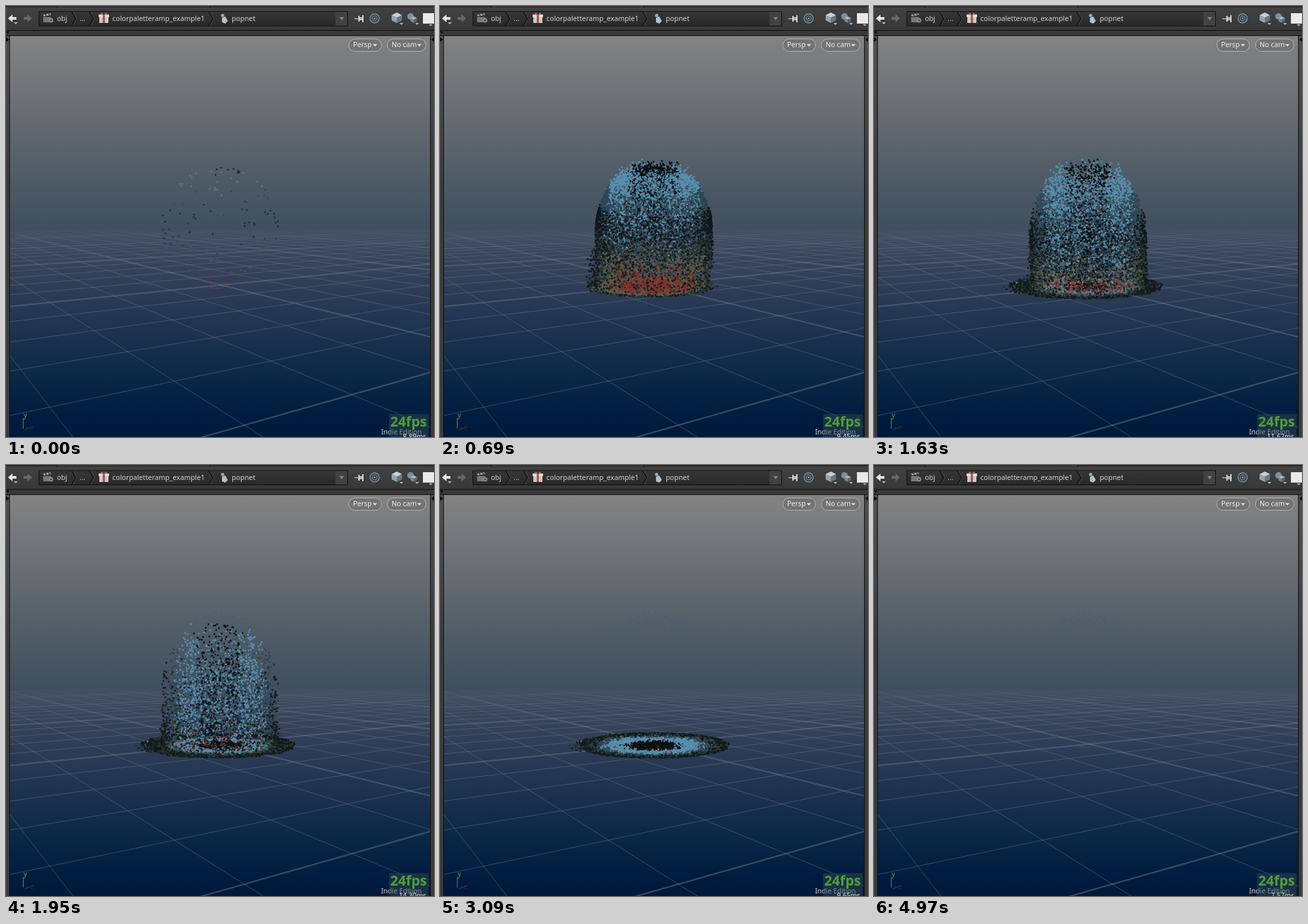
An HTML page with a canvas for the animation above (5040 ms loop, 656x661 px).

```html
<!DOCTYPE html>
<html lang="en">
<head>
<meta charset="utf-8">
<title>Particle viewport</title>
<style>
  html, body { margin: 0; width: 100%; height: 100%; overflow: hidden; background: #333; }
  canvas { display: block; }
</style>
</head>
<body>
<canvas id="stage" width="656" height="661"></canvas>
<script>
const W = 656, H = 661, LOOP = 5040, FRAMES = 65;
const FONT = '"Noto Sans", "Open Sans", sans-serif';
const stage = document.getElementById('stage').getContext('2d');
const backdrop = document.createElement('canvas');
backdrop.width = W;
backdrop.height = H;
const g = backdrop.getContext('2d');

let seed = 20177;
function rand() {
  seed = (seed + 0x6D2B79F5) | 0;
  let r = Math.imul(seed ^ (seed >>> 15), 1 | seed);
  r = (r + Math.imul(r ^ (r >>> 7), 61 | r)) ^ r;
  return ((r ^ (r >>> 14)) >>> 0) / 4294967296;
}

// ---------- drawing helpers ----------
function rect(x, y, w, h, fill) {
  g.fillStyle = fill;
  g.fillRect(x, y, w, h);
}
function vertical(y0, y1, stops) {
  const grad = g.createLinearGradient(0, y0, 0, y1);
  for (const [y, color] of stops) grad.addColorStop((y - y0) / (y1 - y0), color);
  return grad;
}
function poly(points, fill) {
  g.beginPath();
  points.forEach(([x, y]) => g.lineTo(x, y));
  g.closePath();
  g.fillStyle = fill;
  g.fill();
}
function line(points, color, width = 1) {
  g.beginPath();
  points.forEach(([x, y]) => g.lineTo(x, y));
  g.strokeStyle = color;
  g.lineWidth = width;
  g.stroke();
}
function disc(x, y, r, fill) {
  g.beginPath();
  g.arc(x, y, r, 0, 7);
  g.fillStyle = fill;
  g.fill();
}
function ring(x, y, r, color, width = 1) {
  g.beginPath();
  g.arc(x, y, r, 0, 7);
  g.strokeStyle = color;
  g.lineWidth = width;
  g.stroke();
}
function label(text, x, y, color = '#d2d2d2', size = 10.75, weight = 400) {
  g.font = `${weight} ${size}px ${FONT}`;
  g.fillStyle = color;
  g.fillText(text, x, y);
}

// ---------- viewport ----------
const HORIZON = 303;

// Lines share a vanishing point; the inverse slope changes evenly from line to line.
function gridFamily(vx, side, inverse, step, first, last) {
  const stroke = vertical(341, H, [[341, 'rgba(120,132,142,0)'], [356, 'rgba(120,132,142,.17)'],
    [395, 'rgba(120,132,142,.36)'], [H, 'rgba(120,132,142,.46)']]);
  for (let n = first; n <= last; n++) {
    const run = inverse - step * n, drop = 700;
    line([[vx, HORIZON], [vx + side * run * drop, HORIZON + drop]], stroke, n % 5 ? 1 : 2.2);
  }
}

function drawViewport() {
  rect(6, 46, 644, 615, vertical(46, H, [[46, '#838383'], [120, '#737578'], [200, '#5f666d'],
    [270, '#4e5a65'], [325, '#435261'], [375, '#3a475c'], [430, '#2f3d57'], [500, '#1d3350'],
    [570, '#0b2746'], [630, '#001c3f'], [H, '#00193b']]));
  g.save();
  g.beginPath();
  g.rect(6, 46, 644, 615);
  g.clip();
  gridFamily(-174, 1, 4.032, 0.815, -30, 4);
  gridFamily(1562, -1, 9.856, 1.267, -20, 6);
  g.restore();

  // origin marker
  line([[312, 432], [328, 433], [340, 428]], 'rgba(105,85,80,.6)');
  line([[322, 428], [332, 425], [346, 424]], 'rgba(75,85,85,.6)');

  // corner axes
  line([[26.5, 632], [26.5, 648]], '#3c8f36', 1.2);
  line([[29, 650], [36, 647], [42, 645]], '#56362c', 1.2);
  line([[31, 646], [41, 650]], '#3a2c2c');
  label('y', 27, 631, '#58b04a', 10);

  for (const [x, w, text] of [[525, 51, 'Persp'], [584, 60, 'No cam']]) {
    g.beginPath();
    g.roundRect(x + .5, 50.5, w - 1, 19, 9.5);
    g.fillStyle = 'rgba(105,105,105,.55)';
    g.fill();
    g.strokeStyle = '#b4b4b4';
    g.lineWidth = 1;
    g.stroke();
    label(text, x + 7, 63, '#ececec', 10.67);
    const a = x + w - 14;
    poly([[a, 58.5], [a + 7, 58.5], [a + 3.5, 62]], '#e0e0e0');
  }

  label('Indie Edition', 575, 657, '#d5d8d0', 10.5);
  rect(587, 626, 61, 35, 'rgba(48,72,84,.5)');
  g.lineJoin = 'round';
  g.font = `700 21px ${FONT}`;
  g.strokeStyle = '#1e3a2c';
  g.lineWidth = 1.5;
  g.strokeText('24fps', 589, 645);
  label('24fps', 589, 645, '#4d9c46', 21, 700);
}

// ---------- toolbar ----------
function arrow(x, dir, color) {
  const tip = x - dir * 7;
  poly([[tip, 19], [x, 13], [x, 17], [x + dir * 6, 17], [x + dir * 6, 21], [x, 21], [x, 25]], color);
}
function cube(x, y, s, top, left, right) {
  const h = s / 2;
  poly([[x, y - s], [x + s, y - h], [x, y], [x - s, y - h]], top);
  poly([[x - s, y - h], [x, y], [x, y + s], [x - s, y + h]], left);
  poly([[x + s, y - h], [x, y], [x, y + s], [x + s, y + h]], right);
}
function chevron(x) {
  line([[x, 9], [x + 6, 19.5], [x, 30]], '#141414', 1.6);
  line([[x + 1.5, 9], [x + 7.5, 19.5], [x + 1.5, 30]], '#4b4b4b');
}

function drawToolbar() {
  rect(0, 0, W, 46, vertical(0, 46, [[0, '#424242'], [36, '#383838'], [46, '#343434']]));
  rect(0, 0, W, 2, '#272727');
  rect(78, 0, 235, 1, '#3b3b3b');
  for (const x of [78, 312]) rect(x, 0, 1, 3, '#111');
  rect(0, 37, W, 1, '#0e0e0e');
  rect(0, 38, W, 7, '#393939');
  rect(0, 45, W, 1, '#0e0e0e');
  const side = vertical(46, 270, [[46, '#505050'], [270, '#3b3b3b']]);
  rect(0, 46, 6, 615, side);
  rect(650, 46, 6, 615, side);
  for (const x of [5, 650]) rect(x, 46, 1, 615, '#0e0e0e');
  poly([[0, 39], [5, 39], [2.5, 43]], '#050505');
  poly([[0, 48], [5, 51.5], [0, 55]], '#050505');
  poly([[656, 48], [652, 51.5], [656, 55]], '#050505');

  arrow(10, 1, '#e2e2e2');
  poly([[12, 25], [18, 25], [15, 28]], '#bbb');
  arrow(33, -1, '#686868');

  rect(50, 8, 474, 23, '#101010');
  rect(51, 9, 472, 21, vertical(9, 30, [[9, '#363636'], [30, '#292929']]));
  rect(505, 9, 18, 21, '#424242');
  poly([[511, 17], [518, 17], [514.5, 22]], '#858585');
  [101, 128, 311].forEach(chevron);

  // clapper
  rect(57, 17, 12, 8, '#777');
  poly([[57, 13], [68, 11], [69, 14], [58, 16]], '#a0a0a0');
  line([[60, 12], [62, 16]], '#333', 1.5);
  line([[65, 11], [67, 15]], '#333', 1.5);
  disc(69, 22, 3.5, '#8b8b8b');
  disc(69, 22, 1.2, '#333');
  label('obj', 78, 23);
  label('...', 113, 23);

  // parcel
  rect(143, 15, 14, 11, '#cfc8c5');
  rect(142, 13, 16, 4, '#e4dfdc');
  rect(148.5, 13, 3, 13, '#9c4a44');
  disc(147, 12, 1.8, '#b4665e');
  disc(153, 12, 1.8, '#b4665e');
  label('colorpaletteramp_example1', 163, 23);

  // particle node
  disc(332, 14.5, 2.5, '#9aa9b4');
  poly([[331, 18], [336, 16], [340, 23], [336, 27], [331, 25]], '#b4c0c8');
  label('popnet', 346, 23);

  // pin, target, cubes, swatch
  line([[534, 19.5], [540, 19.5]], '#b8b8b8', 1.4);
  rect(540, 15, 2, 9, '#d5d5d5');
  rect(542, 17, 4, 5, '#b5b5b5');
  rect(546, 14, 2, 11, '#d5d5d5');
  ring(565, 19, 7, '#75909f', 1.5);
  ring(565, 19, 3.8, '#6a8798', 1.3);
  disc(565, 19, 1.5, '#7797a9');
  cube(599, 18, 8, '#c4d0d7', '#91a4b0', '#667884');
  disc(620, 16, 5, '#7991a0');
  cube(625, 21, 5, '#aab7bf', '#748895', '#566570');
  for (const x of [606, 630]) poly([[x - 3, 26], [x + 3, 26], [x, 29]], '#b5b5b5');
  rect(639, 11, 17, 16, '#e9e9e9');
  poly([[648, 28], [654, 28], [651, 31]], '#aaa');
}

// ---------- particles ----------
const RADIUS = 89, GROUND = -92, GRAVITY = 480, TILT = 0.17, CX = 328, CY = 338, DOT = 2.5;
const RAMP = [[.05, '#0b1114'], [.19, '#568fae'], [.33, '#2d4655'], [.53, '#11191c'],
  [.68, '#27342f'], [.85, '#5c5a4a'], [1.1, '#86302a']];

function makeParticle() {
  const height = rand() * 2 - 1, angle = rand() * 2 * Math.PI;
  const flat = Math.sqrt(1 - height * height);
  const level = (1 - height) / 2 + (rand() - .5) * .03;
  const birth = rand() < .035 ? 1.4 + rand() * .5 : rand() * 1.42;
  const up = Math.max(height, 0);
  const lift = 208 * Math.pow(rand(), 1.2) * up * up * (.2 + 1.3 * flat);
  const h = height * RADIUS;
  const fall = (lift + Math.sqrt(lift * lift + 2 * GRAVITY * (h - GROUND))) / GRAVITY;
  return {
    x: Math.cos(angle) * flat * RADIUS, z: Math.sin(angle) * flat * RADIUS,
    h, lift, birth, fall,
    vx: (rand() - .5) * 14 - (birth < .2 ? 25 * rand() : 0),
    vz: (rand() - .5) * 14,
    spread: .25 * rand(),
    layer: birth + fall + rand() * .5,
    death: birth + 2.85 + rand() * .15,
    color: RAMP.find(([limit]) => level < limit)[1]
  };
}
const backToFront = Array.from({ length: 26000 }, makeParticle).sort((a, b) => a.z - b.z);
const byLanding = [...backToFront].sort((a, b) => a.layer - b.layer);

const residue = Array.from({ length: 330 }, () => {
  const x = 325 + (rand() + rand() - 1) * 60;
  return [x, 222 + Math.abs(x - 325) * .3 + rand() * 26];
});

function dot(p, x, y) {
  stage.fillStyle = p.color;
  stage.fillRect(CX + x - DOT / 2, CY + y - DOT / 2, DOT, DOT);
}

function drawParticles(time) {
  stage.globalAlpha = time < .05 ? .65 : 1;
  for (const p of byLanding) {
    const rest = time - p.birth - p.fall;
    if (rest < 0 || time > p.death) continue;
    const slide = 1 + p.spread * (1 - Math.exp(-4 * rest));
    dot(p, (p.x + p.vx * p.fall) * slide, (p.z + p.vz * p.fall) * slide * TILT - GROUND);
  }
  for (const p of backToFront) {
    const age = time - p.birth;
    if (age < 0 || age > p.fall) continue;
    const h = p.h + p.lift * age - GRAVITY * age * age / 2;
    dot(p, p.x + p.vx * age, (p.z + p.vz * age) * TILT - h);
  }
  stage.globalAlpha = 1;
}

// ---------- cook time readout ----------
const TIMINGS = [[0, 8.89], [9, 9.45], [15, 9.27], [21, 11.62], [29, 16.35], [40, 9.09], [64, 7.57]];
function cookTime(frame) {
  const i = Math.max(1, TIMINGS.findIndex(([f]) => f >= frame));
  const [f0, v0] = TIMINGS[i - 1], [f1, v1] = TIMINGS[i];
  const k = (frame - f0) / (f1 - f0);
  const wobble = Math.sin(k * Math.PI) * Math.sin(frame * 5.3) * .6;
  return (v0 + (v1 - v0) * k + wobble).toFixed(2) + 'ms';
}

function render(now) {
  const t = now % LOOP;
  const frame = Math.min(FRAMES - 1, Math.floor((t + 9) / 77.6));
  stage.drawImage(backdrop, 0, 0);
  if (frame > 10) {
    stage.fillStyle = 'rgba(66,98,120,.3)';
    for (const [x, y] of residue) stage.fillRect(x, y, 2.2, 2.2);
  }
  drawParticles(frame * .0776 + .007);
  stage.font = `10.5px ${FONT}`;
  stage.textAlign = 'right';
  stage.fillStyle = '#e6e6e6';
  stage.fillText(cookTime(frame), 644, 664);
  requestAnimationFrame(() => render(performance.now() - start));
}

drawToolbar();
drawViewport();
const start = performance.now();
render(0);
</script>
</body>
</html>
```
